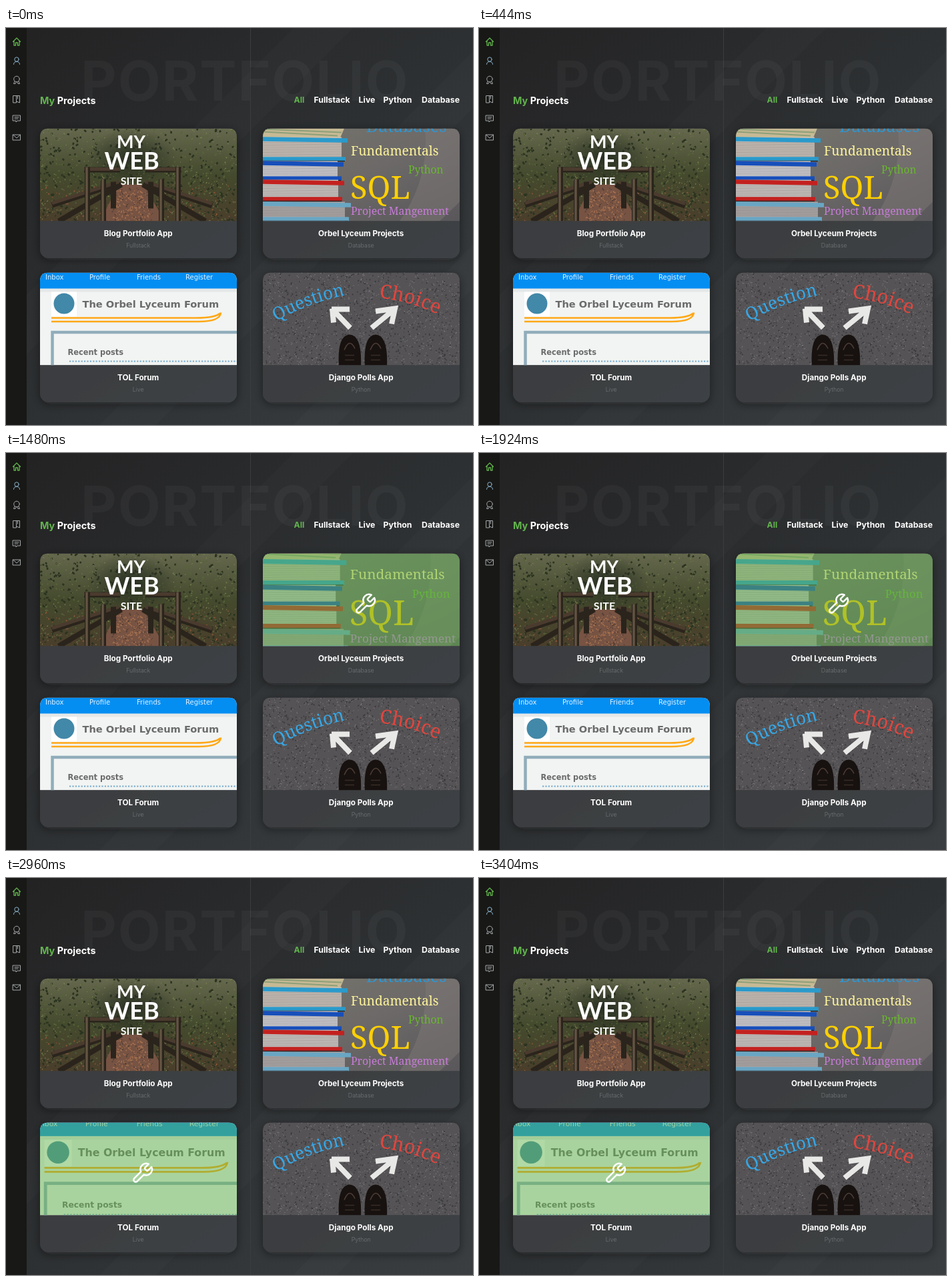
These frames come from a looping animation (700x595 px, 3700 ms). An HTML page:

```html
<!DOCTYPE html>
<html lang="en">
<head>
<meta charset="utf-8">
<title>My Projects</title>
<style>
html, body { margin: 0; width: 100%; height: 100%; overflow: hidden; background: #2b2d2f; }
svg { display: block; width: 700px; height: 595px; }
text { font-family: Inter, sans-serif; font-weight: 700; fill: #fff; }
.mid { text-anchor: middle; }
.title { font-size: 11.7px; }
.tag { font-size: 8.9px; font-weight: 300; fill: #737678; }
.nav { font-size: 12.3px; }
.head { font-size: 14.4px; }
.sign { font-family: Lato, sans-serif; }
.slab { font-family: "Noto Serif", serif; font-weight: 400; }
.forum { font-family: "DejaVu Sans", sans-serif; font-weight: 700; fill: #6b6b6b; }
.forum.link { font-size: 10px; font-weight: 400; fill: #e2f2ff; }
.icons, .wrench { fill: none; stroke: #a4a8ab; stroke-linejoin: round; stroke-linecap: round; }
.wrench { stroke: #fff; stroke-width: 1.7; }
</style>
</head>
<body>
<script>
const SLOT = 740, ZOOM = 1.08, W = 295, H = 139;
const GREEN = '#62b44d';
// card highlighted in each time slot, -1 for none
const hoverOrder = [-1, 0, 1, 3, 2];

let seed = 7;
const random = () => (seed = seed * 16807 % 2147483647) / 2147483647;
const line = (d, color, width, extra = '') =>
  `<path d="${d}" fill="none" stroke="${color}" stroke-width="${width}" ${extra}/>`;
const shape = (d, color, extra = '') => `<path d="${d}" fill="${color}" ${extra}/>`;
const box = (x, y, w, h, color) => `<rect x="${x}" y="${y}" width="${w}" height="${h}" fill="${color}"/>`;
const label = (x, y, text, cls, style = '') => `<text x="${x}" y="${y}" class="${cls}" style="${style}">${text}</text>`;

function specks(count, color, size, [x, y, w, h] = [-2, -2, W + 4, H + 4]) {
  let d = '';
  for (let i = 0; i < count; i++) {
    const dx = (random() - .5) * size * 3, dy = (random() - .5) * size * 3;
    d += `M${(x + random() * w).toFixed(1)} ${(y + random() * h).toFixed(1)}l${dx.toFixed(1)} ${dy.toFixed(1)}`;
  }
  return line(d, color, size);
}

function forest() {
  const bark = '#4a3b2e', dark = '#2a241c';
  return box(0, 0, W, H, 'url(#woods)') +
    specks(420, '#2b3320', 2.6) + specks(380, '#56643a', 1.8) +
    specks(230, '#7d8552', 1.2) + specks(150, '#a09a70', .8) +
    specks(110, '#8a5636', 1.6, [0, 85, W, 54]) +
    box(70, 0, 135, 88, 'url(#gloom)') +
    shape('M118 84H155L187 139H90Z', '#775343') +
    specks(170, '#a6714f', 1.5, [110, 92, 58, 47]) + specks(90, '#523d32', 1.5, [108, 90, 62, 49]) +
    line('M66 62H120M158 62H212M18 115L118 82M258 116L158 82M28 139L122 84M248 139L154 84', dark, 8) +
    line('M66 61H120M158 61H212M18 112L118 80M258 113L158 80', bark, 5) +
    line('M71 58V139M95 76V139M110 80V120M207 58V139M182 76V139M166 80V120', dark, 8) +
    line('M70 58V139M94 76V139M206 58V139M181 76V139', '#625342', 3.5) +
    label(136.5, 29, 'MY', 'sign mid', 'font-size:27px') +
    label(137.5, 61, 'WEB', 'sign mid', 'font-size:36px') +
    label(137, 84.5, 'SITE', 'sign mid', 'font:600 23px "Open Sans",sans-serif;font-stretch:75%');
}

function book(y, height, right, cover, pages) {
  const end = right - 7;
  let out = box(-2, y, end, height, pages);
  for (let i = y + 8; i < y + height - 6; i += 2.5) out += line(`M-2 ${i}L${end - 2} ${i + .8}`, '#88827f', .6);
  return out + line(`M-2 ${y + 3}L${right} ${y + 5}M-2 ${y + height - 3}H${right - 3}`, cover, 6.5) +
    line(`M-2 ${y + height}H${right - 4}`, '#26252a', 1.3);
}

function books() {
  const words = [
    [155, 5, 'Databases', '#2f96d0', 25], [132, 40.5, 'Fundamentals', '#fff59a', 19.2],
    [218, 67, 'Python', '#68b82d', 15.6], [131, 105, 'SQL', '#ffd000', 47],
    [132, 129, 'Project Mangement', '#c77cd8', 15.8]];
  return box(0, 0, W, H, 'url(#wall)') +
    shape('M205 139Q250 75 243 0H295V110L265 139Z', '#817b78', 'opacity=".45"') +
    shape('M0 0H122L116 14H0Z', '#c7b994') + line('M0 5L112 11M0 1L118 6', '#8da079', 2) +
    book(13, 36, 127, '#2a9acb', '#c5bdb5') + book(49, 29, 121, '#174fba', '#cbcbd1') +
    book(77, 32, 122, '#c3211f', '#c7c1bf') + book(110, 29, 132, '#69a6c4', '#a7a3a3') +
    words.map(([x, y, text, color, size]) => label(x, y, text, 'slab', `fill:${color};font-size:${size}px`)).join('');
}

function forum() {
  const links = [[8, 'Inbox'], [74, 'Profile'], [145, 'Friends'], [218, 'Register']];
  return box(0, 0, W, H, '#f1f4f2') + box(0, 24, W, 5, '#e5e8e8') + box(0, 0, W, 24, '#048ef2') +
    links.map(([x, text]) => label(x, 10.5, text, 'forum link')).join('') +
    box(17, 29, 38, 37, '#fff') + '<circle cx="36" cy="46.5" r="15.5" fill="#4288a8"/>' +
    label(63.5, 52, 'The Orbel Lyceum Forum', 'forum', 'font-size:14.6px') +
    line('M17 68H235Q262 68 270 61M17 73.5H235Q270 74 271 60', '#ffa817', 2.6) +
    line('M296 89.5H18.5V141', '#91adbb', 4.5) +
    label(41.5, 123, 'Recent posts', 'forum', 'font-size:11.4px') +
    line('M44 133H296', '#74a9cc', 2.2, 'stroke-dasharray="2.2 2.2"');
}

function curved(id, d, text, color, size) {
  return `<path id="${id}" d="${d}" fill="none"/><text class="slab" style="fill:${color};font-size:${size}px">` +
    `<textPath href="#${id}">${text}</textPath></text>`;
}

function asphalt() {
  const boot = x => shape(`M${x - 16} 141Q${x - 19} 94 ${x} 93Q${x + 19} 94 ${x + 17} 141Z`, '#17110f') +
    line(`M${x - 8} 116Q${x} 97 ${x + 8} 114`, '#4b3c34', 1.6) +
    line(`M${x - 7} 124H${x + 7}M${x - 7} 131H${x + 7}`, '#382c27', 1.4);
  return box(0, 0, W, H, '#555355') +
    specks(900, '#39383b', 1.5) + specks(700, '#77757a', 1.1) + specks(330, '#a09ea1', .8) +
    line('M103 55H130M104 54L106 75M106 57L131 83M169 58L198 54L193 77M196 56L163 83', '#e8e8e6', 8) +
    boot(130) + boot(169) +
    curved('rise', 'M20 73Q68 45 128 33', 'Question', '#37a7e6', 26) +
    curved('fall', 'M174 38Q225 43 271 67', 'Choice', '#df463f', 29);
}

const cards = [
  [51, 150.5, 'Blog Portfolio App', 'Fullstack', forest],
  [385, 150.5, 'Orbel Lyceum Projects', 'Database', books],
  [51, 366.5, 'TOL Forum', 'Live', forum],
  [385, 366.5, 'Django Polls App', 'Python', asphalt]];

const wrench = 'M14.7 6.3a1 1 0 0 0 0 1.4l1.6 1.6a1 1 0 0 0 1.4 0l3.77-3.77a6 6 0 0 1-7.94 7.94l-6.91 6.91' +
  'a2.12 2.12 0 0 1-3-3l6.91-6.91a6 6 0 0 1 7.94-7.94z';

const drawCard = ([x, y, title, tag, photo]) => `<g transform="translate(${x} ${y})">
  <rect width="${W}" height="194.5" rx="13" fill="url(#card)" filter="url(#shadow)"/>
  <g clip-path="url(#frame)"><g class="photo">${photo()}</g></g>
  <g class="cover" visibility="hidden">
    <g clip-path="url(#frame)"><rect width="${W}" height="${H}" fill="${GREEN}" opacity=".5"/></g>
    <path class="wrench" transform="translate(136 58.5) scale(1.45)" d="${wrench}"/>
  </g>
  ${label(147.2, 161.5, title, 'title mid')}${label(147.2, 178.5, tag, 'tag mid')}</g>`;

const nav = [[439.5, 'All'], [488.5, 'Fullstack'], [541, 'Live'], [587, 'Python'], [651.5, 'Database']];

const stops = colors => colors.map((c, i) => `<stop offset="${i / (colors.length - 1)}" stop-color="${c}"/>`).join('');

document.body.innerHTML = `<svg viewBox="0 0 700 595">
<defs>
  <linearGradient id="page" x2="1" y2="1">${stops(['#232223', '#2d3032', '#3a3e41'])}</linearGradient>
  <linearGradient id="card" x2="1" y2="1">${stops(['#38393b', '#3e4245'])}</linearGradient>
  <linearGradient id="woods" x2="0" y2="1">${stops(['#65684d', '#444a2d', '#4a3e2b'])}</linearGradient>
  <radialGradient id="gloom"><stop stop-color="#22291f" stop-opacity=".85"/><stop offset="1" stop-color="#22291f" stop-opacity="0"/></radialGradient>
  <linearGradient id="wall" x2="1" y2="1">${stops(['#77766c', '#6c6968', '#59575a'])}</linearGradient>
  <clipPath id="frame"><path d="M0 ${H}V13Q0 0 13 0H282Q295 0 295 13V${H}Z"/></clipPath>
  <filter id="shadow" x="-15%" y="-15%" width="130%" height="135%">
    <feDropShadow dx="0" dy="3" stdDeviation="7" flood-color="#17181a" flood-opacity=".45"/></filter>
</defs>
${box(0, 0, 700, 595, 'url(#page)')}
${shape('M31 400L431 0H520L31 489ZM140 595L700 35V120L225 595ZM430 595L700 325V390L495 595Z', '#fff', 'opacity=".014"')}
${box(366, 0, 1, 595, '#3a3d3f')}
${box(0, 0, 31, 595, '#181816')}
<g class="icons">
  <path stroke="${GREEN}" stroke-width="1.3" d="M10.5 20.5L16 15L21.5 20.5M12 19.5V26H14.5V22H17.5V26H20V19.5"/>
  <path stroke="#88aec6" d="M11.5 54.5Q11.5 50.5 16 50.5T20.5 54.5"/><circle cx="16" cy="47" r="3.2" stroke="#88aec6"/>
  <circle cx="16" cy="76.5" r="4.3"/><path d="M13 80L11.5 83.5H14L15 81.5M19 80L20.5 83.5H18L17 81.5"/>
  <path d="M11 101.5H15.5V112H11ZM15.5 101.5H20.5V112L15.5 110M17.5 102V106"/>
  <path d="M10.5 131H21.5V139H17L15 141V139H10.5ZM13 133.7H19M13 136H18"/>
  <path d="M10.5 160H21.5V168H10.5ZL16 165L21.5 160"/>
</g>
${label(112, 109, 'PORTFOLIO', '', 'font-size:83px;letter-spacing:2px;fill-opacity:.035')}
${label(51, 114, `<tspan fill="${GREEN}">My</tspan> Projects`, 'head')}
${nav.map(([x, text], i) => label(x, 112.3, text, 'nav mid', i ? '' : `fill:${GREEN}`)).join('')}
${cards.map(drawCard).join('')}
</svg>`;

const photos = document.querySelectorAll('.photo');
const covers = document.querySelectorAll('.cover');
const zoomed = `translate(${W / 2} ${H / 2}) scale(${ZOOM}) translate(${-W / 2} ${-H / 2})`;
let shown = -1;

function tick() {
  const active = hoverOrder[Math.floor(performance.now() / SLOT) % hoverOrder.length];
  if (active !== shown) {
    shown = active;
    cards.forEach((_, i) => {
      photos[i].setAttribute('transform', i === active ? zoomed : '');
      covers[i].setAttribute('visibility', i === active ? 'visible' : 'hidden');
    });
  }
  requestAnimationFrame(tick);
}
tick();
</script>
</body>
</html>
```
